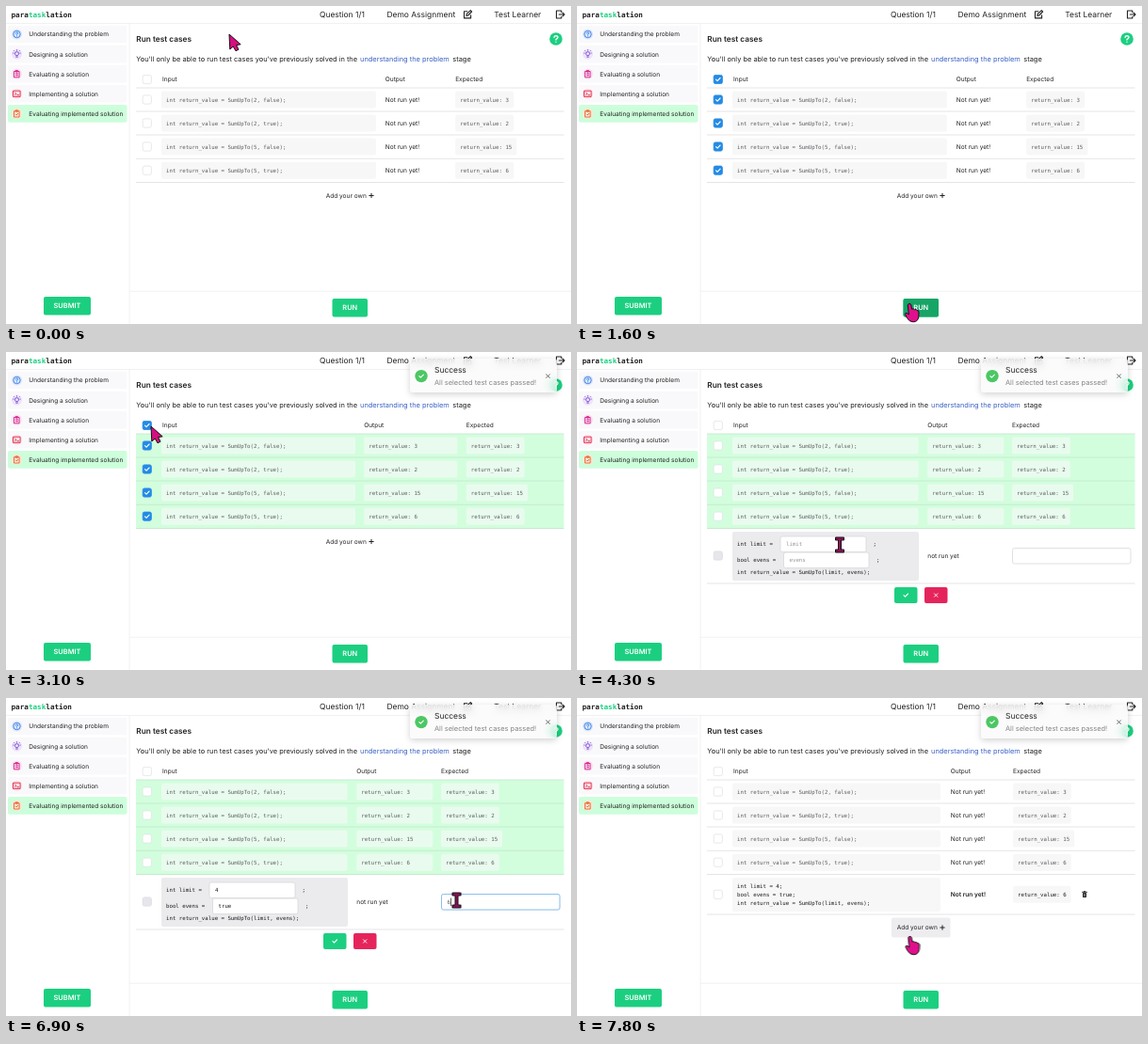
Animation, 600 px wide and 338 px high, one loop 8000 ms. Source, as an HTML page:

```html
<!DOCTYPE html>
<html lang="en">
<head>
<meta charset="utf-8">
<title>Run test cases</title>
<style>
html, body { margin: 0; width: 100%; height: 100%; overflow: hidden; background: #fff; }
svg { display: block; position: absolute; left: 0; top: 0; text-rendering: geometricPrecision; }
text { font: 6.56px Inter, sans-serif; fill: #222; white-space: pre; }
.big { font-size: 8.44px; }
.title { font-size: 8.3px; font-weight: 600; }
.lead { font-size: 7.43px; }
.bold { font-weight: 600; }
.link { fill: #3b62c4; }
.code { font: 5.73px "DejaVu Sans Mono", monospace; fill: #5c5c60; }
.dark { fill: #1c1c1e; }
.hint { fill: #96969b; }
.logo { font: bold 7.65px "DejaVu Sans Mono", monospace; }
.btn { font-size: 7.4px; font-weight: 600; fill: #fff; text-anchor: middle; }
.line { fill: none; stroke-linecap: round; stroke-linejoin: round; }
#toast {
  position: absolute; left: 429px; top: 7px; width: 156px; height: 36px;
  border-radius: 3px; background: rgba(250, 250, 250, .72); backdrop-filter: blur(4px);
  box-shadow: 0 2px 7px rgba(0, 0, 0, .18);
  animation: pop 8s infinite;
}
#over { pointer-events: none; }
#cursor { animation: travel 8s infinite ease-in-out; }
@keyframes pop {
  0%, 26.25% { opacity: 0; transform: scale(.9); }
  29.4%, 100% { opacity: 1; transform: none; }
}
@keyframes travel {
  0%, 5.6% { transform: translate(237px, 30px); }
  10.6%, 13.1% { transform: translate(154px, 79px); }
  19.4%, 23.75% { transform: translate(353px, 316px); }
  33.75%, 40.6% { transform: translate(154px, 79px); }
  45.6%, 48.1% { transform: translate(358px, 202px); }
  53.1%, 60.6% { transform: translate(279px, 205px); }
  65.6%, 72.5% { transform: translate(263px, 222px); }
  80%, 89.4% { transform: translate(478.5px, 215px); }
  93.75%, 100% { transform: translate(353.5px, 253px); }
}
</style>
</head>
<body>
<svg id="page" width="600" height="338"></svg>
<div id="toast"></div>
<svg id="over" width="600" height="338">
  <g id="cursor" stroke="#141014" stroke-linejoin="round">
    <path data-on="0 1520 1950 3560 3850 4150 5880 6380 7230 7450" fill="#d4107f"
      d="M0 0L.8 16L4.3 13L7 17.8L10 16.2L7.6 11.6L12.2 10.8Z"/>
    <path data-on="1520 1950 3560 3850 7450 8000" fill="#e0108c"
      d="M-1.8 1.6Q0 -1 1.8 1.4L2.5 6.2Q4.6 5 5.4 6.8Q7.4 5.8 8 7.6Q9.8 7.2 10 9.2L9.8 14.6Q9 19.8 4 19.8Q0 19.8 -2.4 15.8L-4.6 11.6Q-4.4 9.4 -2.2 10.6L-.6 12Z"/>
    <path data-on="4150 5880 6380 7230" fill="#8c1259"
      d="M-4.5-8H4.5V-5H1.5V5H4.5V8H-4.5V5H-1.5V-5H-4.5Z"/>
  </g>
</svg>
<script>
const LOOP = 8000;
const GREEN = '#1ccf80';
const rowY = [99.5, 124.5, 149.5, 174.7];
const cases = [['2, false', 3], ['2, true', 2], ['5, false', 15], ['5, true', 6]];

const text = (x, y, s, cls = '') => `<text x="${x}" y="${y}" class="${cls}">${s}</text>`;
const rect = (x, y, w, h, fill, r = 2, stroke = 'none') =>
  `<rect x="${x}" y="${y}" width="${w}" height="${h}" rx="${r}" fill="${fill}" stroke="${stroke}" stroke-width=".8"/>`;
const line = (d, color, w = .9) => `<path class="line" d="${d}" stroke="${color}" stroke-width="${w}"/>`;
const at = (x, y, s) => `<g transform="translate(${x} ${y})">${s}</g>`;
const on = (times, s) => `<g data-on="${times}">${s}</g>`;
const rule = (y, color = '#dedee2') => rect(138, y - .4, 454.5, .8, color, 0);
const tick = (color = '#fff', w = 1.1) => line('M-2.2 .1L-.7 1.6L2.3-1.5', color, w);
const cross = (r, color) => line(`M${-r} ${-r}L${r} ${r}M${r} ${-r}L${-r} ${r}`, color);

function chip(x, y, value, fill, w) {
  const s = 'return_value: ' + value;
  return rect(x, y - 9, w || s.length * 3.45 + 10, 18, fill) + text(x + 5, y + 2, s, 'code');
}

function table({ end, out, exp, passed, outW }) {
  const cell = passed ? '#e9fbee' : '#f7f7f8';
  let s = text(166, 80.4, 'Input') + text(out, 80.4, 'Output') + text(exp, 80.4, 'Expected');
  if (passed) s += rect(138, 87, 454.5, 101, '#d2fedd', 0);
  s += [87, 112, 137, 162.2, 187.6].map(y => rule(y, passed ? '#c3e6cc' : '#dedee2')).join('');
  cases.forEach(([args, value], i) => {
    const y = rowY[i];
    s += rect(165, y - 9, end - 165, 18, cell) + text(170, y + 2, `int return_value = SumUpTo(${args});`, 'code');
    s += passed ? chip(out, y, value, cell, outW) : text(out, y + 2.2, 'Not run yet!');
    s += chip(exp, y, value, cell);
  });
  return s;
}

const addButton = y => text(339.7, y + 2.3, 'Add your own') + line(`M385.8 ${y}H390.2M388 ${y - 2.2}V${y + 2.2}`, '#222', 1);
const addHover = y => rect(334, y - 10.5, 62.5, 21, '#ededf0', 2);
const button = (x, y, w, h, label, fill) => rect(x, y, w, h, fill, 2) + text(x + w / 2, y + h / 2 + 2.6, label, 'btn');
const box = (y, fill = '#fff', stroke = '#e3e3e8') => rect(145.2, y - 4.6, 9.2, 9.2, fill, 1.8, stroke);

// Input field with focus window, caret and typed steps [time, string]
function field(x, y, w, h, hint, focus, typed, code = 'code dark') {
  const base = y + h / 2 + 2.1, tx = x + 6;
  let s = rect(x, y, w, h, '#fff', 2, '#d9d9de') + on(focus.join(' '), rect(x, y, w, h, '#fff', 2, '#74b6ea'));
  if (hint) s += on(`3800 ${typed[0][0]}`, text(tx, base, hint, 'code hint'));
  typed.forEach(([from, str], i) => {
    const to = typed[i + 1] ? typed[i + 1][0] : LOOP;
    s += on(`${from} ${to}`, text(tx, base, str, code));
  });
  const stops = [[focus[0], ''], ...typed];
  stops.forEach(([from, str], i) => {
    const to = stops[i + 1] ? stops[i + 1][0] : focus[1];
    s += on(`${from} ${to}`, rect(tx + str.length * 3.5, y + 4, .7, h - 8, '#222', 0));
  });
  return s;
}

function form() {
  return box(216.5, '#e6e6eb', '#dcdce2') + rect(165, 191, 198, 52, '#ebebed') +
    text(170, 206, 'int limit =', 'code dark') + text(314.5, 206, ';', 'code dark') +
    text(170, 223, 'bool evens =', 'code dark') + text(318, 223, ';', 'code dark') +
    text(170, 235.8, 'int return_value = SumUpTo(limit, evens);', 'code dark') +
    field(216, 196, 91, 16.5, 'limit', [4500, 5200], [[4600, '4']]) +
    field(219.5, 213, 90.5, 16.5, 'evens', [5200, 6400],
      [[5400, 't'], [5500, 'tr'], [5600, 'tru'], [5700, 'true']]) +
    text(372.3, 219, 'not run yet') + rule(246) +
    field(462.5, 208.5, 125.5, 16.5, '', [6450, 7600], [[6700, '6']], 'code') +
    rect(337, 250, 24.5, 17, GREEN) + at(349.2, 258.5, tick()) +
    rect(369, 250, 24.5, 17, '#e5245c') + at(381.2, 258.5, cross(1.7, '#fff'));
}

function newRow() {
  return box(208.8) + rect(165, 191, 221, 36, '#f7f7f8') +
    ['int limit = 4;', 'bool evens = true;', 'int return_value = SumUpTo(limit, evens);']
      .map((s, i) => text(170, 202.3 + i * 8.6, s, 'code dark')).join('') +
    text(396.8, 211, 'Not run yet!', 'bold') +
    rect(463, 199.8, 61.5, 18, '#f7f7f8') + text(468, 210.8, 'return_value: 6', 'code dark') +
    at(539, 208.8, rect(-2, -1.7, 4, 4.9, '#222', .7) + line('M-2.5-2.5H2.5M-.8-3.2H.8', '#222') + line('M-.6-.4V1.8M.6-.4V1.8', '#fff', .4)) +
    rule(230) + addHover(244) + addButton(244);
}

const clip = color => line('M-2.6-2.7H2.6V3.6H-2.6ZM-1-3.6H1V-2.2H-1Z', color);
const items = [
  ['Understanding the problem', '#3478e0', '#dbe8fd', c => `<circle r="3.7" fill="none" stroke="${c}" stroke-width=".9"/>` +
    line('M-1.1-.9Q-1-2.1 0-2.1Q1.3-2 1.2-.9Q1-.3 0 .4M0 1.9V2', c)],
  ['Designing a solution', '#7038c8', '#ece3fb', c => line('M-1 1.4Q-2.2.3-2-.8Q-1.5-2.5 0-2.5Q1.5-2.5 2-.8Q2.2.3 1 1.4ZM-.8 3H.8M0-4.4V-4M-3.8-1H-3.5M3.8-1H3.5M-2.8-3.4L-2.6-3.2M2.8-3.4L2.6-3.2', c)],
  ['Evaluating a solution', '#d31d8b', '#fbe0f0', c => clip(c) + line('M-1.1-.4H1.1M-1.1 1.5H1.1', c)],
  ['Implementing a solution', '#dc2448', '#fde0e5', c => line('M-3.6-3.1H3.6V3.1H-3.6ZM-2-1.3L-.7 0L-2 1.3M.4 1.4H2', c)],
  ['Evaluating implemented solution', '#e2642c', '#fbe5d3', c => clip(c) + line('M-1.2 .7L-.3 1.6L1.3-.2', c)]
];

function sidebar() {
  return items.map(([label, color, tint, icon], i) => {
    const y = 30 + i * 21.1, active = i === 4;
    return rect(2, y - 9.3, 126.5, 18.6, active ? '#cdfedb' : '#f9f9fb', 2) +
      at(11.5, y, `<circle r="5.6" fill="${tint}"/>` + icon(color)) + text(24.3, y + 2.4, label);
  }).join('') + button(40, 309, 50, 19.5, 'SUBMIT', GREEN);
}

function header() {
  return text(5.5, 11.7, 'para<tspan fill="#1ccf80">task</tspan>lation', 'logo') +
    text(333, 12, 'Question 1/1', 'big') + text(404.5, 12, 'Demo Assignment', 'big') + text(518.2, 12, 'Test Learner', 'big') +
    at(490.3, 9, line('M-.5-3.2H-3.8V3.9H3.3V.8M-1.4 1.4L-1-.6L3-4.3L4.3-3L.4 1Z', '#222', 1.1)) +
    at(588.3, 9, line('M1.5-2.3V-4H-3.8V4H1.5V2.3M-1 0H4.6M2.8-1.9L4.7 0L2.8 1.9', '#222', 1.1)) +
    rect(0, 18, 600, .7, '#ebebee', 0) + rect(130.7, 18, .7, 320, '#ebebee', 0);
}

function checks() {
  return [78, ...rowY].map(y => box(y) +
    on('1000 3200', box(y, '#228be6', '#228be6') + at(149.8, y, tick()))).join('');
}

document.getElementById('page').innerHTML = header() + sidebar() +
  text(138.3, 37.6, 'Run test cases', 'title') +
  text(138.3, 59.2, 'You\'ll only be able to run test cases you\'ve previously solved in the', 'lead') +
  text(376, 59.2, 'understanding the problem', 'lead link') + text(474.3, 59.2, 'stage', 'lead') +
  `<circle cx="584" cy="35" r="6.8" fill="${GREEN}"/>` +
  at(584, 35, line('M-2-1.6Q-1.8-3.4 0-3.4Q2.2-3.2 2-1.5Q1.7-.5 0 .5V1.1M0 3.2V3.3', '#fff', 1.3)) +
  on('0 2000', table({ end: 393, out: 402.8, exp: 477.2 })) +
  on('2000 3800', table({ end: 371, out: 380.2, exp: 488.8, passed: true, outW: 99 })) +
  on('3800 7600', table({ end: 362.5, out: 372.3, exp: 462, passed: true, outW: 81 })) +
  on('7600 8000', table({ end: 386, out: 396.8, exp: 463 })) +
  checks() +
  on('3560 3800', addHover(201.5)) + on('0 3800', addButton(201.5)) +
  on('3800 7600', form()) + on('7600 8000', newRow()) +
  rect(131, 302.8, 469, .7, '#ebebee', 0) +
  button(346.5, 311, 37.5, 19.5, 'RUN', GREEN) +
  on('1520 1950', button(346.5, 311, 37.5, 19.5, 'RUN', '#16a567'));

document.getElementById('toast').innerHTML = '<svg width="156" height="36">' +
  '<circle cx="12" cy="18.6" r="6.7" fill="#4cc764"/>' + at(12, 18.6, tick()) +
  text(26, 15, 'Success', 'big') +
  '<text x="26" y="28" class="lead" style="fill:#85858a">All selected test cases passed!</text>' +
  at(146.6, 18.6, cross(1.8, '#555')) + '</svg>';

// data-on holds pairs of start and end times in ms
for (const el of document.querySelectorAll('[data-on]')) {
  const times = el.dataset.on.split(' ').map(Number);
  const frames = times.map((ms, i) => ({ opacity: i % 2 ? 0 : 1, offset: ms / LOOP }));
  if (times[0] > 0) frames.unshift({ opacity: 0, offset: 0 });
  if (times.at(-1) < LOOP) frames.push({ opacity: 0, offset: 1 });
  frames.forEach(f => f.easing = 'step-end');
  el.animate(frames, { duration: LOOP, iterations: Infinity });
}
</script>
</body>
</html>
```
